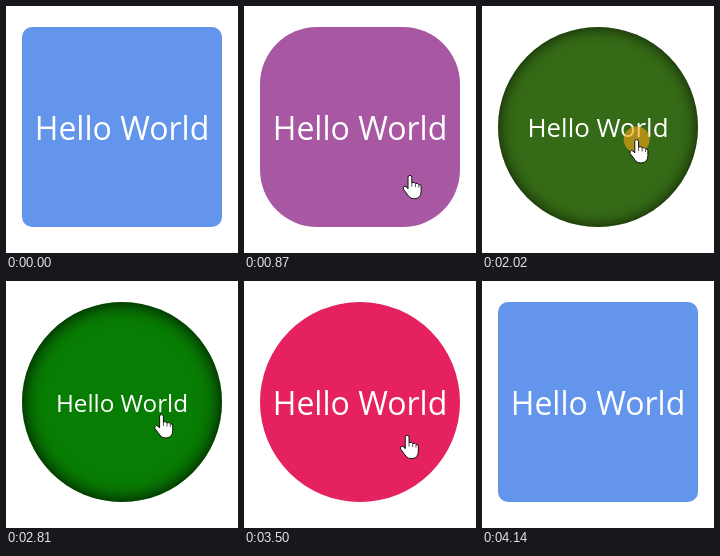
These frames come from a looping animation (232 px wide and 247 px high, 4830 ms). An HTML page:

```html
<!DOCTYPE html>
<html lang="en">
<head>
<meta charset="utf-8">
<title>Hover box</title>
<style>
  html, body { margin: 0; width: 100%; height: 100%; overflow: hidden; background: #fff; }
  #box {
    position: absolute; left: 16px; top: 21px; width: 200px; height: 200px;
    display: flex; align-items: center; justify-content: center;
    color: #fff; font-family: "Open Sans", "Noto Sans", sans-serif; white-space: nowrap;
  }
  svg { position: absolute; left: 0; top: 0; }
</style>
</head>
<body>
<div id="box">Hello World</div>
<svg width="232" height="247" viewBox="0 0 232 247">
  <circle id="press" r="13" fill="rgb(236,162,20)" fill-opacity=".65"/>
  <g id="hand" stroke="#111" fill="#fff" stroke-linejoin="round">
    <path d="M-1.9 13.5V2a1.9 1.9 0 0 1 3.8 0V7.5q3-1 3.6 .8q2.8-.8 3.3 1q2.4-.4 2.4 2V16q0 7-6.5 7.5q-4 .3-6-2.5L-6.5 14q-1-2.6 1.5-3q1.5 0 3.1 2.5Z"/>
    <path d="M1.9 7.5V11.5M5.5 8.5V12M8.8 9.5V12.5" fill="none" stroke-width=".7"/>
  </g>
  <path id="arrow" d="M.5 .5V16.5L4.2 13L6.7 18.5L9 17.5L6.6 12H11.5Z"
    stroke="#000" fill="#fff" stroke-linejoin="miter"/>
</svg>
<script>
const LOOP = 4830, DURATION = 500;
const ENTER = 718, PRESS = 1788, RELEASE = 2786, LEAVE = 3665;

const REST  = { color: [100, 149, 237], radius: 10,  font: 32, shade: 0 };
const HOVER = { color: [229, 33, 95],   radius: 100, font: 32, shade: 0 };
const DOWN  = { color: [0, 128, 0],     radius: 100, font: 24, shade: 1 };

const changes = [
  [ENTER, REST, HOVER], [PRESS, HOVER, DOWN], [RELEASE, DOWN, HOVER], [LEAVE, HOVER, REST]
];

// time, x, y of the pointer tip
const path = [
  [640, 176, 225], [718, 174, 221], [870, 166, 169.5], [970, 158.5, 145], [1130, 154, 133.5],
  [1790, 154, 133.5], [2300, 155.5, 133.5], [3450, 155.5, 133.5],
  [3560, 172, 178], [3665, 189, 221], [3780, 191, 225.5], [4140, 191, 225.5]
];

const $ = id => document.getElementById(id);
const box = $('box'), press = $('press'), hand = $('hand'), arrow = $('arrow');
const mix = (a, b, k) => a + (b - a) * k;
const clamp = v => Math.max(0, Math.min(1, v));

// cubic-bezier(.25, .1, .25, 1)
function ease(x) {
  if (x <= 0 || x >= 1) return clamp(x);
  let lo = 0, hi = 1, t;
  for (let i = 0; i < 24; i++) {
    t = (lo + hi) / 2;
    const u = 1 - t;
    if (0.75 * t * u * u + 0.75 * t * t * u + t * t * t < x) lo = t; else hi = t;
  }
  const u = 1 - t;
  return 0.3 * t * u * u + 3 * t * t * u + t * t * t;
}

function pointer(t) {
  let i = 0;
  while (i < path.length - 2 && t > path[i + 1][0]) i++;
  const [t0, x0, y0] = path[i], [t1, x1, y1] = path[i + 1];
  const k = clamp((t - t0) / (t1 - t0));
  return [mix(x0, x1, k), mix(y0, y1, k)];
}

function drawBox(t) {
  const [start, from, to] = changes.filter(c => t >= c[0]).pop() || changes[0];
  const k = ease((t - start) / DURATION);
  const shade = mix(from.shade, to.shade, k);
  box.style.backgroundColor = `rgb(${from.color.map((c, i) => Math.round(mix(c, to.color[i], k)))})`;
  box.style.borderRadius = mix(from.radius, to.radius, k) + 'px';
  box.style.fontSize = mix(from.font, to.font, k) + 'px';
  box.style.boxShadow = `inset 0 0 ${20 * shade}px rgba(0,0,0,${shade})`;
}

function drawPointer(t) {
  const [x, y] = pointer(t);
  const inside = t >= ENTER && t < LEAVE;
  const shown = t >= 640 && t < 4140;
  const show = (el, on) => {
    el.style.display = on ? '' : 'none';
    el.setAttribute('transform', `translate(${x} ${y})`);
  };
  show(press, t >= PRESS && t < RELEASE);
  show(hand, inside);
  show(arrow, shown && !inside);
  arrow.style.opacity = 1 - clamp((t - 3980) / 160);
}

const begin = performance.now();
function frame() {
  const t = (performance.now() - begin) % LOOP;
  drawBox(t);
  drawPointer(t);
  requestAnimationFrame(frame);
}
frame();
</script>
</body>
</html>
```
